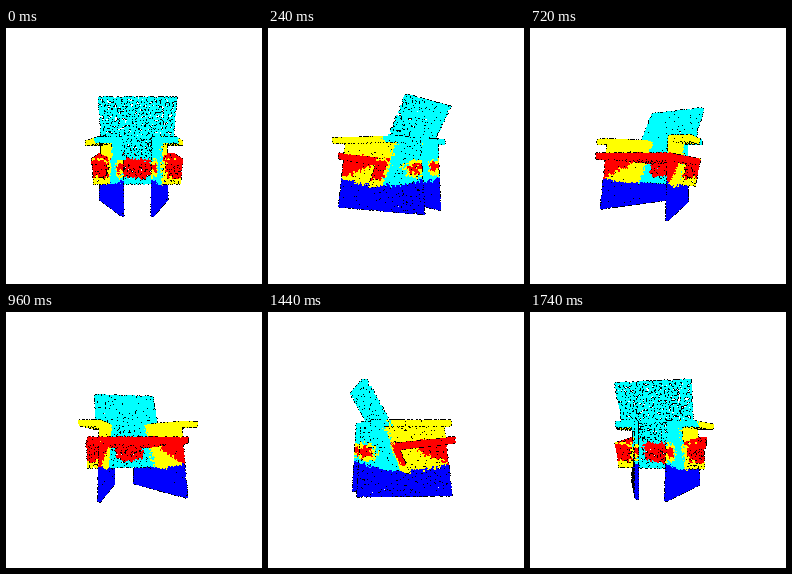
A matplotlib script that plays this animation: 256 by 256 pixels, repeating every 1800 ms.

```python
import numpy as np
import matplotlib.pyplot as plt
from matplotlib.animation import FuncAnimation

SIZE, FRAMES, LOOP_MS = 256, 30, 1800
CAMERA = 259            # distance from the turning axis
BODY, RIM = 1.2, 1.6    # radius of a dot and of its dark rim
CENTRE = 3              # the chair stands a little beside the axis
NAMES = ("cyan", "yellow", "red", "blue", "black")
CYAN, YELLOW, RED, BLUE, BLACK = range(5)
PALETTE = np.array([plt.matplotlib.colors.to_rgb(n) for n in NAMES]) * 255
rng = np.random.default_rng(7)

# side profile of the backrest: (backwards, up)
CREST, HIP, WAIST, HEEL = (40.5, 49), (22, 17), (14, -3), (4, -27)


def mix(a, b, t):
    return a + (b - a) * t


def grid(width, height, step):
    """Jittered unit-square positions, about one per step in each direction."""
    n, m = (max(2, round(side / step)) for side in (width, height))
    s, t = np.meshgrid(np.linspace(0, 1, n), np.linspace(0, 1, m))
    s = s + rng.uniform(-.5, .5, s.shape) / n
    t = t + rng.uniform(-.5, .5, t.shape) / m
    return np.clip(s, 0, 1).ravel(), np.clip(t, 0, 1).ravel()


def band(half, start, end, step=1.9):
    """Crosswise board between two points of the side profile."""
    s, t = grid(2 * half, np.hypot(end[0] - start[0], end[1] - start[1]), step)
    return np.column_stack([CENTRE + half * (2 * s - 1),
                            mix(start[0], end[0], t), mix(start[1], end[1], t)])


def splay(side, b):
    """Sideways place of a side panel, wider apart towards the front."""
    return 1.3 + .04 * b + side * (26 - .31 * b)


def panel(side):
    s, t = grid(86, 66, 1.9)
    b = mix(mix(-33, 37, s), mix(-40.5, 41, s), t)
    return np.column_stack([splay(side, b), b, mix(15.5, -50, t)])


def arm(side):
    s, t = grid(17, 66, 2.2)
    b = mix(-36, 28, t) + 5 * s
    return np.column_stack([splay(side, b) + side * 18 * s, b, fill(b, 16.)])


def layers(make, count, shift):
    """Several fresh copies of a part, each moved on by the shift."""
    return np.vstack([make() + np.array(shift) * i for i in range(count)])


def fill(points, value):
    return np.full(len(points), value)


def blur(values, amount):
    return values + rng.normal(0, amount, len(values))


def panel_labels(p):
    b, h = blur(p[:, 1], 1.5), blur(p[:, 2], 1)
    out = fill(p, YELLOW)
    out[(b < -8) & (h < -1) & (h > -6 + .4 * b)] = RED
    out[b > 13 + .41 * h] = CYAN
    patch = np.hypot((b - 34) / 9, (h + 11) / 8)
    out[patch < 1] = YELLOW
    out[patch < .6] = RED
    out[h < -28 + 8 * (b / 42) ** 2] = BLUE
    return out


def plate_labels(p):
    """Cyan stripes where the panels cross, red fields between them."""
    side, h = blur(np.abs(p[:, 0] - CENTRE), 1), blur(p[:, 2], 1)
    seat = (h < -3) & (h > -21)
    out = fill(p, CYAN)
    out[side > 24] = YELLOW
    out[seat & ((side < 14) | (side > 28))] = RED
    return out


def build():
    """Points as (sideways, backwards, up) with a colour index each."""
    back = layers(lambda: band(32.5, CREST, HIP, 2.8), 3, (0, -1.6, .5))
    plate = np.vstack([band(23, HIP, WAIST), band(42, WAIST, HEEL)])
    seat = np.vstack([layers(lambda: band(43, (-39, -2), (10, -7)), 3, (0, 0, 1.8)),
                      band(43, (-39, 2), (-39, -2))])
    parts = [(back, fill(back, CYAN)), (plate, plate_labels(plate)),
             (seat, fill(seat, RED))]
    for side in (-1, 1):
        wall = layers(lambda: panel(side), 2, (-side * 1.2, 0, 0))
        rest = layers(lambda: arm(side), 3, (0, 0, -1.6))
        parts += [(wall, panel_labels(wall)),
                  (rest, np.where(blur(rest[:, 1], 2) > 18, CYAN, YELLOW))]
    return np.vstack([p for p, _ in parts]), np.concatenate([c for _, c in parts])


points, labels = build()


def render(angle):
    u, b, h = points.T
    x = u * np.cos(angle) + b * np.sin(angle)
    near = b * np.cos(angle) - u * np.sin(angle)
    zoom = CAMERA / (CAMERA - near)
    sx, sy = SIZE / 2 + x * zoom, SIZE / 2 - h * zoom

    dots = []
    for dx in range(-2, 3):
        for dy in range(-2, 3):
            px, py = np.floor(sx).astype(int) + dx, np.floor(sy).astype(int) + dy
            r = np.hypot(px + .5 - sx, py + .5 - sy)
            dark = r > BODY
            # rims sit further back, so close neighbours cover them
            depth = near - .2 * r - 7 * dark
            ink = np.where(dark, BLACK, labels)
            dots.append([v[r < RIM] for v in (px, py, depth, ink)])
    cols, rows, depth, ink = map(np.concatenate, zip(*dots))

    order = np.argsort(depth, kind="stable")
    image = np.full((SIZE, SIZE, 3), 255, dtype=np.uint8)
    image[rows[order], cols[order]] = PALETTE[ink[order]]
    return image


fig = plt.figure(figsize=(2.56, 2.56), dpi=100, facecolor="white")
ax = fig.add_axes([0, 0, 1, 1])
ax.axis("off")
picture = ax.imshow(render(0), interpolation="nearest", aspect="auto")


def update(frame):
    picture.set_data(render(2 * np.pi * frame / FRAMES))
    return (picture,)


anim = FuncAnimation(fig, update, frames=FRAMES, interval=LOOP_MS / FRAMES,
                     repeat=True, repeat_delay=0)
plt.show()
```
